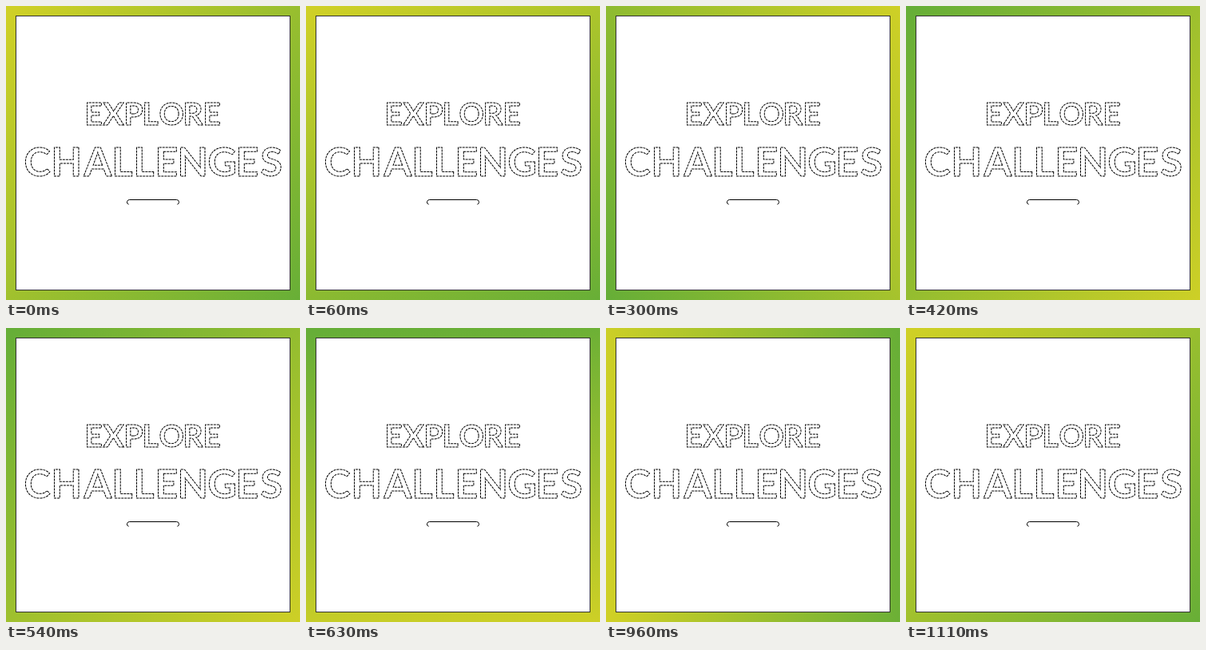
Animation of 368x368 px, one loop 1.2 s. Source, as an HTML page with a canvas:

```html
<!DOCTYPE html>
<html lang="en">
<head>
<meta charset="utf-8">
<title>Explore challenges</title>
<style>
html, body { margin: 0; width: 100%; height: 100%; overflow: hidden; background: #fff; }
canvas { display: block; }
</style>
</head>
<body>
<canvas id="stage" width="368" height="368" aria-label="Explore challenges"></canvas>
<script>
const ctx = document.getElementById("stage").getContext("2d");
const SIZE = 368, LOOP = 1200, STEP = 30;
const YELLOW = "#cfd026", GREEN = "#66ae37";
const START_ANGLE = 130;

// Four quarter turns with rests between them; power above 1 eases out
const TURNS = [
  { from: 30, to: 150, power: 1 },
  { from: 270, to: 420, power: 1 },
  { from: 510, to: 750, power: 1 },
  { from: 870, to: 1110, power: 1.6 }
];

function angleAt(time) {
  const t = Math.floor(time / STEP) * STEP;
  let angle = START_ANGLE;
  for (const { from, to, power } of TURNS) {
    const p = Math.min(1, Math.max(0, (t - from) / (to - from)));
    angle += 90 * (1 - (1 - p) ** power);
  }
  return angle * Math.PI / 180;
}

// Corner-to-corner gradient at any angle, 0 pointing up
function drawGradient(angle) {
  const dx = Math.sin(angle), dy = -Math.cos(angle);
  const reach = SIZE / 2 * (Math.abs(dx) + Math.abs(dy));
  const c = SIZE / 2 + 6;
  const g = ctx.createLinearGradient(
    c - dx * reach, c - dy * reach, c + dx * reach, c + dy * reach);
  g.addColorStop(0, YELLOW);
  g.addColorStop(1, GREEN);
  ctx.fillStyle = g;
  ctx.fillRect(0, 0, SIZE, SIZE);
}

// Hairline word with even tracking between left and right
function drawWord(word, left, right, base, cap) {
  const font = px => `700 ${px}px Lato, "Open Sans", sans-serif`;
  ctx.font = font(100);
  ctx.font = font(100 * cap / ctx.measureText("E").actualBoundingBoxAscent);
  const letters = [...word].map(ch => {
    const m = ctx.measureText(ch);
    return { ch, bearing: m.actualBoundingBoxLeft,
      width: m.actualBoundingBoxLeft + m.actualBoundingBoxRight };
  });
  const ink = letters.reduce((sum, l) => sum + l.width, 0);
  const gap = (right - left - ink) / (letters.length - 1);
  let x = left;
  for (const { ch, bearing, width } of letters) {
    ctx.strokeText(ch, Math.round(x) + 0.5 + bearing, base + 0.5);
    x += width + gap;
  }
}

// Rule under the words, open at the bottom
function drawBar(x, y, w, h) {
  const r = h / 2;
  ctx.beginPath();
  ctx.arc(x + r, y + r, r, Math.PI * 0.6, Math.PI * 1.5);
  ctx.arc(x + w - r, y + r, r, -Math.PI / 2, Math.PI * 0.4);
  ctx.stroke();
}

function drawPanel() {
  ctx.fillStyle = "#fff";
  ctx.lineWidth = 1;
  ctx.fillRect(12, 12, 344, 344);
  ctx.strokeStyle = "#333";
  ctx.strokeRect(12.5, 12.5, 343, 343);
  ctx.strokeStyle = "#000";
  ctx.setLineDash([3, 1]);
  drawWord("EXPLORE", 101, 267, 148, 28);
  drawWord("CHALLENGES", 23, 344, 212, 36);
  ctx.setLineDash([]);
  drawBar(151.5, 242.5, 65, 6);
}

function frame(now) {
  drawGradient(angleAt(now % LOOP));
  drawPanel();
  requestAnimationFrame(frame);
}
frame(0);
</script>
</body>
</html>
```
